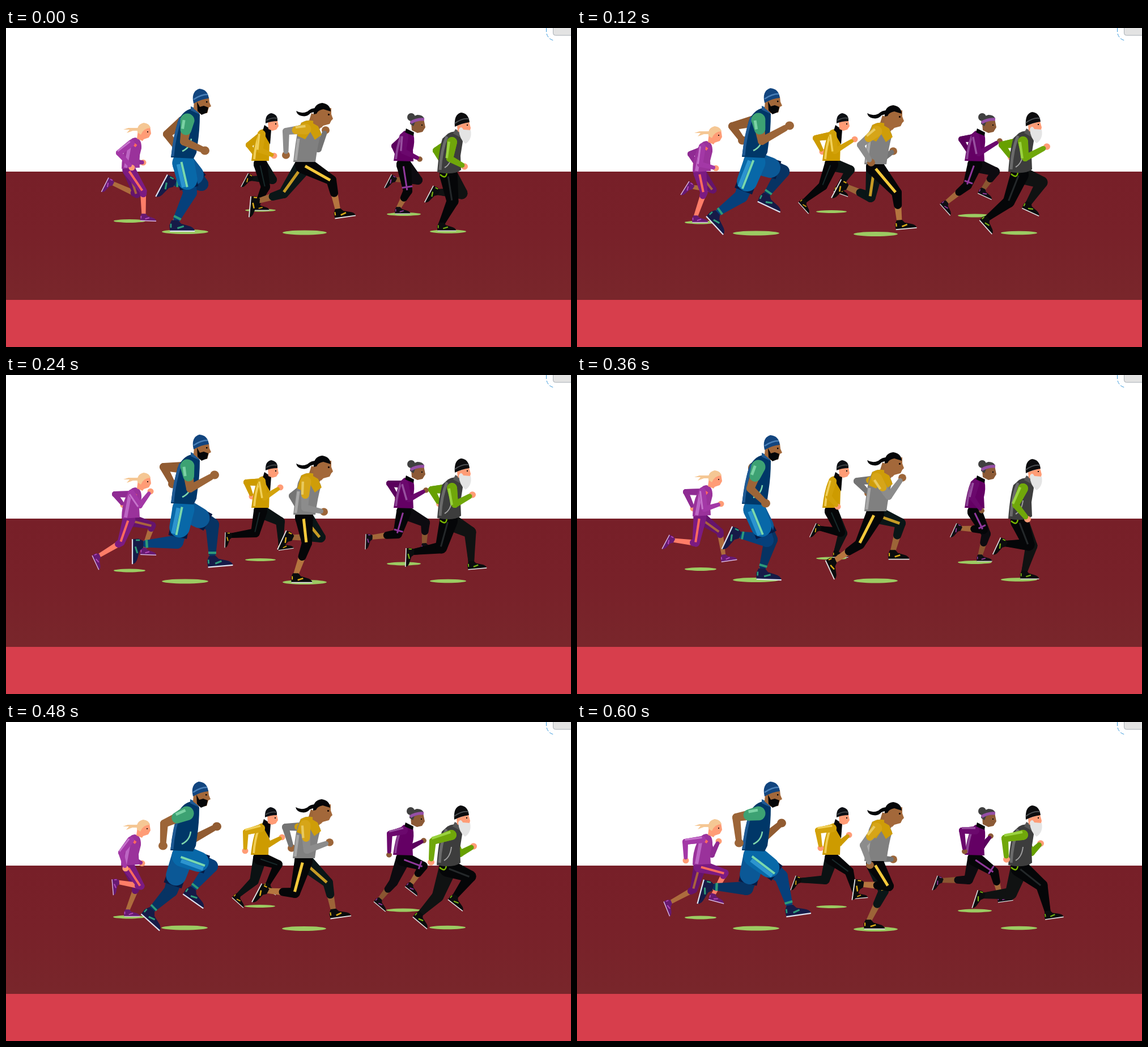
Recreate the animation shown at these times as an HTML page with a canvas. Size 997 px wide and 562 px high, loop 720 ms.

```html
<!DOCTYPE html>
<html lang="en">
<head>
<meta charset="utf-8">
<title>Runners</title>
<style>
html, body { margin: 0; width: 100%; height: 100%; overflow: hidden; background: #fff; }
canvas { display: block; }
</style>
</head>
<body>
<canvas id="stage" width="997" height="562"></canvas>
<script>
const ctx = document.getElementById('stage').getContext('2d');
const STEP = 120, COUNT = 6;
const SHADOW_DY = [0, 2.5, 4.5, 2, 3.5, 4.5];
const SHIFT_X = [0, 0, 0, 0, -1, 0];
const PEACH = '#ff9c76', BROWN = '#9c6538', BLACK = '#050608';

// Pose row: bob, then near and far leg (knee, ankle, foot angle),
// then near and far arm (elbow, hand).
const pinkWoman = {
  shadow: [218, 340, 28, 3], hip: [217, 250], shoulder: [221, 203], farShoulder: [231, 205],
  leg: { w: [23, 13, 7], near: '#7b1b82', far: '#65146c', cut: .12, skin: '#ff7d68', farSkin: '#ad6c3d',
         stripe: '#ff6b5e', farStripe: '#a9633d', sw: 4 },
  shoe: { size: 28, color: '#671a72', accent: '#b44bb9', sole: '#d9b9e2' },
  arm: { w: [12, 9], top: '#a338a6', low: '#a338a6', far: '#8f2b93', farTop: '#8f2b93', shine: '#c675cc', hand: PEACH, farHand: PEACH, r: 5.5 },
  torso: [['#9a329b', 'M228 193Q240 195 239 212L235 228L236 246L204 248Q204 225 212 208Q218 194 228 193Z'],
    ['#bd66c4', 'M219 203L211 246', 6], ['#ff6b5e', 'M219 200L230 208', 5]],
  head: [['#f5c794', 'M236 176L216 176L207 179L218 179L213 185L224 181L236 181Z'],
    [PEACH, 'M233 180L254 173L256 186L252 193L243 196L241 199L231 195Z'],
    ['#f5c794', 'M232 184Q230 170 243 167Q253 168 255 176Q243 176 238 188Z'],
    ['#301410', 'M249 182h2v2h-2z']],
  poses: [
    [0, 242,287, 243,330, 2, 231,293, 187,273, 117, 199,220, 222,246, 230,236, 242,237],
    [6, 224,290, 209,333, 0, 240,285, 203,280, 122, 217,240, 245,247, 200,222, 210,240],
    [5, 203,295, 163,319, 65, 258,265, 243,307, 2, 236,230, 255,205, 192,210, 207,229],
    [1, 210,296, 169,291, 118, 252,276, 259,319, -8, 225,236, 254,227, 192,206, 205,235],
    [5, 238,289, 197,282, 85, 230,292, 214,333, 0, 203,230, 211,258, 225,242, 240,249],
    [4, 261,266, 240,305, 15, 206,295, 164,318, 68, 191,211, 192,244, 238,234, 250,210]]
};

const blueMan = {
  shadow: [316, 359, 41, 4], hip: [313, 238], shoulder: [320, 163], farShoulder: [312, 165],
  leg: { w: [37, 24, 11], near: '#06407b', far: '#073363', cut: .86, skin: BROWN, farSkin: BROWN,
         band: '#2f9b79', shorts: '#0868a8', farShorts: '#0b5896', hem: '#071b45', stripe: '#79d8ad', sw: 4 },
  shoe: { size: 44, color: '#161b48', accent: '#2f9b79', sole: '#dfe3ef' },
  arm: { w: [20, 13], top: '#3da273', low: BROWN, far: '#915b31', farTop: '#915b31', cut: .42, topW: 25, shine: '#7ad2a4', hand: BROWN, farHand: '#915b31', r: 8 },
  torso: [['#003768', 'M328 142L342 152Q342 180 338 205L336 220L331 230L291 228Q295 195 303 165Q312 145 328 142Z'],
    ['#1f5a94', 'M308 158Q297 190 294 226', 5], ['#1f5a94', 'M326 138L341 145V152L326 145Z'],
    ['#7ed6ac', 'M327 195Q325 211 311 217', 2.5]],
  head: [['#a3683a', 'M332 128L358 122L359 131L362 138L358 140L355 150L342 151L331 142Z'],
    [BLACK, 'M337 130L342 139L349 137L357 140L355 149L345 153L338 146Z'],
    ['#12457f', 'M331 133Q326 112 341 107Q356 108 358 124Q345 125 331 133Z'],
    ['#4a80b8', 'M331 126Q344 117 356 117', 2.5], [BLACK, 'M353 129h2.5v2.5h-2.5z']],
  poses: [
    [0, 325,290, 298,343, 0, 345,275, 294,273, 118, 314,200, 351,216, 284,187, 302,212],
    [-1, 290,296, 245,328, 47, 363,253, 333,296, 25, 326,199, 375,172, 274,173, 292,198],
    [-2, 301,294, 238,298, 90, 364,264, 364,323, -5, 325,200, 368,176, 278,162, 294,192],
    [-1, 335,291, 284,281, 115, 342,290, 326,345, 2, 306,200, 333,226, 312,195, 325,220],
    [-2, 362,254, 328,296, 35, 291,297, 255,333, 42, 279,179, 277,218, 331,206, 372,184],
    [-2, 360,272, 376,327, -8, 299,293, 236,290, 105, 281,168, 286,213, 331,203, 361,178]]
};

const yellowMan = {
  shadow: [449, 321, 27, 2.5], hip: [449, 240], shoulder: [451, 187], farShoulder: [452, 189],
  leg: { w: [24, 16, 8], near: BLACK, far: '#0b1213', cut: 1, skin: BLACK, farSkin: BLACK, stripe: '#182a2b', sw: 2 },
  shoe: { size: 27, color: '#0a0c0d', accent: '#d2a313', sole: '#d8d8d8' },
  arm: { w: [14, 9], top: '#d3a20a', low: '#d3a20a', far: '#cd9b00', farTop: '#cd9b00', shine: '#f1d05a', hand: PEACH, farHand: PEACH, r: 5.5 },
  torso: [['#cd9b00', 'M448 180Q460 174 467 185L465 205L464 234L433 234Q436 205 443 188Z'],
    ['#f0cd55', 'M447 187Q440 207 438 231', 4], [BLACK, 'M456 171L468 179L466 205L459 193L453 181Z']],
  head: [[PEACH, 'M462 164L479 163L481 173L477 179L470 181L463 178Z'],
    ['#0c0f14', 'M458 168Q457 152 468 150Q480 152 479 164Q468 164 458 168Z'],
    ['#4c5052', 'M459 163Q470 157 478 159', 1.5], [BLACK, 'M475 168h2v2h-2z']],
  poses: [
    [0, 458,280, 443,312, 0, 470,267, 433,265, 118, 448,215, 473,225, 428,206, 441,225],
    [0, 434,278, 401,305, 48, 482,250, 461,281, 20, 455,217, 490,196, 421,194, 433,218],
    [0, 440,278, 396,283, 92, 484,258, 485,299, -8, 456,216, 484,198, 424,189, 434,214],
    [0, 465,277, 428,270, 115, 469,279, 457,312, 0, 444,214, 460,232, 447,210, 455,228],
    [0, 480,251, 462,286, 30, 438,280, 409,306, 42, 423,194, 422,227, 463,216, 487,203],
    [0, 480,263, 491,302, -5, 438,278, 393,279, 110, 425,191, 430,222, 463,214, 480,199]]
};

const yellowWoman = {
  shadow: [527, 360.5, 39, 4], hip: [526, 241], shoulder: [529, 178], farShoulder: [538, 180],
  leg: { w: [32, 18, 9], near: BLACK, far: '#0a1617', cut: .42, skin: '#b5753f', farSkin: BROWN,
         stripe: '#f5c93b', farStripe: '#c79b25', sw: 5 },
  shoe: { size: 37, color: '#0a0c0d', accent: '#d9a917', sole: '#e4e4e4' },
  arm: { w: [17, 11], top: '#d6a518', low: '#8c8c8c', far: '#747474', farTop: '#cf9d08', cut: .5, topW: 19, shine: '#e9ca60', hand: BROWN, farHand: BROWN, r: 7 },
  torso: [[BROWN, 'M539 150L560 160L554 178L534 166Z'],
    ['#808080', 'M521 167Q535 159 548 166L556 185Q550 205 546 236L507 236Q511 200 515 180Z'],
    ['#cf9d08', 'M521 167Q535 159 548 166L557 188L545 197L537 183L528 196L514 190Z'],
    ['#a8a8a8', 'M516 195L511 233', 5]],
  head: [['#a3683a', 'M543 145L574 141L574 152L577 160L574 163L571 169L560 172L556 176L542 168Z'],
    [BLACK, 'M543 152Q542 134 558 132Q572 134 573 147L560 143Q550 145 548 151Z'],
    [BLACK, 'M547 141Q538 141 532 147Q522 152 512 146Q514 154 522 155Q532 157 537 150L546 147Z'],
    ['#241006', 'M568 151h3v3h-3z']],
  poses: [
    [0, 574,268, 586,322, -8, 490,291, 444,305, 95, 494,182, 494,224, 551,213, 564,180],
    [4, 564,290, 569,342, -5, 518,298, 474,279, 118, 500,206, 519,237, 540,229, 558,217],
    [10, 531,296, 511,353, 0, 555,286, 503,286, 115, 527,234, 561,241, 505,213, 516,235],
    [4, 499,298, 453,328, 65, 571,261, 557,312, 0, 550,214, 574,181, 494,187, 514,208],
    [4, 510,301, 459,297, 118, 568,283, 578,333, -8, 531,226, 571,212, 493,185, 504,222],
    [9, 550,289, 502,286, 98, 541,298, 514,352, 0, 505,217, 517,252, 536,241, 558,242]]
};

const purpleWoman = {
  shadow: [702, 328, 30, 3], hip: [702, 241], shoulder: [703, 191], farShoulder: [704, 193],
  leg: { w: [26, 16, 8], near: BLACK, far: '#0d0b10', cut: .4, skin: '#a3683a', farSkin: '#8a5631',
         stripe: '#91389c', sw: 3, knee: '#91389c' },
  shoe: { size: 27, color: '#100f14', accent: '#91389c', sole: '#d8d8d8' },
  arm: { w: [14, 9], top: '#6b086d', low: '#6b086d', far: '#5b005d', farTop: '#5b005d', shine: '#97509f', hand: '#8c5a36', farHand: '#8c5a36', r: 5 },
  torso: [['#640064', 'M703 181L719 187Q722 200 718 215L719 235L684 234Q688 205 695 188Z'],
    ['#8c4394', 'M697 190Q690 210 688 231', 4], [BLACK, 'M706 177L720 184L719 190L704 184Z']],
  head: [['#404040', 'M708 157a7 7 0 1 0 14 0a7 7 0 1 0-14 0'],
    ['#8c5a36', 'M715 167L737 160L740 175L735 183L726 185L716 180Z'],
    ['#404040', 'M713 169Q714 156 726 153Q736 153 738 160L722 166L719 173Z'],
    ['#9650a7', 'M714 167Q724 160 738 161', 5], [BLACK, 'M733 170h2v2h-2z']],
  poses: [
    [0, 709,287, 692,318, 0, 727,268, 686,267, 118, 701,217, 730,231, 685,208, 693,229],
    [0, 689,277, 651,308, 48, 738,253, 716,285, 25, 709,221, 746,199, 678,196, 692,220],
    [0, 691,280, 644,286, 92, 740,260, 738,299, -5, 711,219, 741,203, 676,191, 691,217],
    [0, 717,272, 676,270, 115, 722,280, 711,319, 0, 697,216, 714,239, 700,212, 709,232],
    [0, 736,254, 714,286, 38, 684,282, 659,313, 40, 677,197, 676,234, 713,221, 737,209],
    [0, 736,264, 747,308, -8, 691,278, 643,279, 110, 679,191, 684,228, 715,219, 730,201]]
};

const beardedMan = {
  shadow: [780, 358.5, 32, 3.3], hip: [781, 259], shoulder: [787, 201], farShoulder: [785, 202],
  leg: { w: [32, 21, 10], near: BLACK, far: '#101212', cut: 1, skin: BLACK, farSkin: BLACK, stripe: '#24282a', sw: 3 },
  shoe: { size: 33, color: '#0b0d0e', accent: '#75ad12', sole: '#dedede' },
  arm: { w: [18, 11], top: '#70a70a', low: '#70a70a', far: '#67a000', farTop: '#67a000', shine: '#9bd340', hand: PEACH, farHand: PEACH, r: 6 },
  torso: [['#7ab800', 'M766 258Q777 268 778 254', 2.5],
    ['#3d3d3d', 'M780 186Q792 178 803 188L806 200L802 225L803 250Q790 260 761 254Q764 215 770 195Z'],
    ['#6b6b6b', 'M778 191Q768 215 766 250', 5], ['#565656', 'M793 178L805 185L802 193L789 186Z'],
    ['#a0a0a0', 'M787 222Q785 240 774 246', 2]],
  head: [[PEACH, 'M796 172L817 165L820 176L818 184L805 186L797 182Z'],
    ['#e4e4e4', 'M799 179Q803 171 807 179L820 180Q823 196 811 204Q800 196 799 179Z'],
    ['#0c0c0e', 'M792 174Q790 152 803 149Q816 150 818 166Q804 168 792 174Z'],
    ['#4c4f52', 'M792 168Q805 158 817 160', 2], [BLACK, 'M813 170h2v2h-2z']],
  poses: [
    [0, 788,305, 768,346, 0, 804,291, 761,289, 118, 783,230, 809,244, 759,216, 772,240],
    [-1, 762,306, 723,336, 48, 820,272, 796,310, 25, 791,229, 829,209, 750,206, 766,228],
    [-2, 768,304, 717,312, 92, 819,277, 821,331, -5, 792,228, 823,211, 751,202, 765,227],
    [-1, 797,299, 755,297, 115, 802,301, 789,348, 0, 774,229, 795,254, 777,220, 789,244],
    [-2, 819,272, 792,308, 38, 762,307, 730,339, 40, 753,210, 750,247, 801,232, 825,219],
    [-2, 820,288, 831,336, -8, 766,302, 716,306, 108, 755,205, 758,242, 802,230, 818,214]]
};

const runners = [pinkWoman, yellowMan, purpleWoman, blueMan, yellowWoman, beardedMan];
for (const r of runners)
  for (const part of [...r.torso, ...r.head]) part[1] = new Path2D(part[1]);

const mix = (a, b, t) => [a[0] + (b[0] - a[0]) * t, a[1] + (b[1] - a[1]) * t];

function limb(a, b, wa, wb, color) {
  const t = Math.atan2(b[1] - a[1], b[0] - a[0]), q = Math.PI / 2;
  ctx.beginPath();
  ctx.arc(a[0], a[1], wa / 2, t + q, t + 3 * q);
  ctx.arc(b[0], b[1], wb / 2, t - q, t + q);
  ctx.fillStyle = color;
  ctx.fill();
}

function line(a, b, w, color, off = 0) {
  const d = Math.hypot(b[0] - a[0], b[1] - a[1]) || 1;
  const nx = -(b[1] - a[1]) / d * off, ny = (b[0] - a[0]) / d * off;
  ctx.beginPath();
  ctx.moveTo(a[0] + nx, a[1] + ny);
  ctx.lineTo(b[0] + nx, b[1] + ny);
  ctx.lineWidth = w;
  ctx.strokeStyle = color;
  ctx.stroke();
}

function disc(x, y, rx, ry, color) {
  ctx.beginPath();
  ctx.ellipse(x, y, rx, ry, 0, 0, 7);
  ctx.fillStyle = color;
  ctx.fill();
}

function paint(parts) {
  for (const [color, path, w] of parts) {
    if (w) {
      ctx.lineWidth = w;
      ctx.strokeStyle = color;
      ctx.stroke(path);
    } else {
      ctx.fillStyle = color;
      ctx.fill(path);
    }
  }
}

const shoePath = new Path2D('M-.2 .34L-.22 .1L-.13 -.1L.13 -.1L.25 .04L.52 .12Q.78 .18 .8 .34Z');
function shoe(at, angle, s) {
  ctx.save();
  ctx.translate(at[0], at[1]);
  ctx.rotate(angle * Math.PI / 180);
  ctx.scale(s.size, s.size);
  ctx.fillStyle = s.color;
  ctx.fill(shoePath);
  line([.1, .22], [.36, .14], .07, s.accent);
  line([-.16, .04], [-.16, .2], .06, s.accent);
  line([-.2, .34], [.8, .34], .05, s.sole);
  ctx.restore();
}

function drawLeg(r, hip, knee, ankle, angle, near) {
  const s = r.leg, [w0, w1, w2] = s.w, color = near ? s.near : s.far;
  limb(knee, ankle, w1 * .8, w2, near ? s.skin : s.farSkin);
  limb(knee, mix(knee, ankle, s.cut), w1, w1 + (w2 - w1) * s.cut, color);
  if (s.band) line(mix(knee, ankle, .8), mix(knee, ankle, .87), w2 + 3, s.band);
  limb(hip, knee, w0, w1, color);
  const stripe = near ? s.stripe : s.farStripe;
  if (s.shorts) {
    const end = mix(hip, knee, .56);
    line(mix(hip, knee, .5), mix(hip, knee, .85), w0 - 4, s.hem);
    limb(hip, end, w0 + 2, w0 - 1, near ? s.shorts : s.farShorts);
    if (near) {
      line(hip, mix(hip, knee, .78), 7, '#2c94cf', 9);
      line(mix(hip, knee, -.05), mix(hip, knee, .8), s.sw, stripe, 3);
    }
  } else if (stripe) {
    line(mix(hip, knee, .05), mix(hip, knee, .97), s.sw, stripe, 1);
  }
  if (near && s.knee) {
    const dx = (knee[1] - hip[1]) * .2, dy = (hip[0] - knee[0]) * .2, p = mix(hip, knee, .85);
    line([p[0] - dx, p[1] - dy], [p[0] + dx, p[1] + dy], 3, s.knee);
  }
  shoe(ankle, angle, r.shoe);
}

function drawArm(r, shoulder, elbow, hand, near) {
  const s = r.arm, [w0, w1] = s.w, low = near ? s.low : s.far, top = near ? s.top : s.farTop;
  disc(hand[0], hand[1], s.r, s.r * .95, near ? s.hand : s.farHand);
  limb(elbow, mix(elbow, hand, .84), w1 + 1, w1 - 2, low);
  limb(shoulder, elbow, w0, w1 + 1, low);
  const end = mix(shoulder, elbow, s.cut || 1);
  limb(shoulder, end, s.topW && near ? s.topW : w0, s.topW && near ? s.topW - 5 : w1 + 1, top);
  if (near) line(shoulder, end, w0 * .25, s.shine, w0 * .3);
}

function drawRunner(r, i) {
  const p = r.poses[i], bob = p[0], dx = SHIFT_X[i];
  const pt = n => [p[n], p[n + 1]];
  const body = ([x, y]) => [x + dx, y + bob];
  const hip = body(r.hip);
  drawArm(r, body(r.farShoulder), pt(15), pt(17), false);
  drawLeg(r, hip, pt(6), pt(8), p[10], false);
  drawLeg(r, hip, pt(1), pt(3), p[5], true);
  ctx.save();
  ctx.translate(dx, bob);
  paint(r.torso);
  paint(r.head);
  ctx.restore();
  drawArm(r, body(r.shoulder), pt(11), pt(13), true);
}

const track = ctx.createLinearGradient(0, 253, 0, 479);
track.addColorStop(0, '#771f28');
track.addColorStop(.5, '#782129');
track.addColorStop(1, '#79262b');

function drawScene() {
  const rect = (y, h, color) => { ctx.fillStyle = color; ctx.fillRect(0, y, 997, h); };
  rect(0, 253, '#fff');
  rect(253, 226, track);
  rect(479, 83, '#d73e4c');
  ctx.beginPath();
  ctx.roundRect(965.5, -20, 60, 33, 4);
  ctx.fillStyle = '#e3e3e3';
  ctx.fill();
  ctx.lineWidth = 1;
  ctx.strokeStyle = '#a9b0b6';
  ctx.stroke();
  ctx.setLineDash([7, 3]);
  ctx.strokeStyle = '#3d9bdc';
  ctx.stroke(new Path2D('M953.5 0V8Q956 20 967 22'));
  ctx.setLineDash([]);
}

function draw(i) {
  drawScene();
  for (const { shadow: [x, y, rx, ry] } of runners)
    disc(x + SHIFT_X[i], y + SHADOW_DY[i], rx, ry, '#9ccb62');
  for (const r of runners) drawRunner(r, i);
}

const start = performance.now();
let shown = -1;
function tick() {
  const i = Math.floor((performance.now() - start) / STEP) % COUNT;
  if (i !== shown) draw(shown = i);
  requestAnimationFrame(tick);
}
tick();
</script>
</body>
</html>
```
